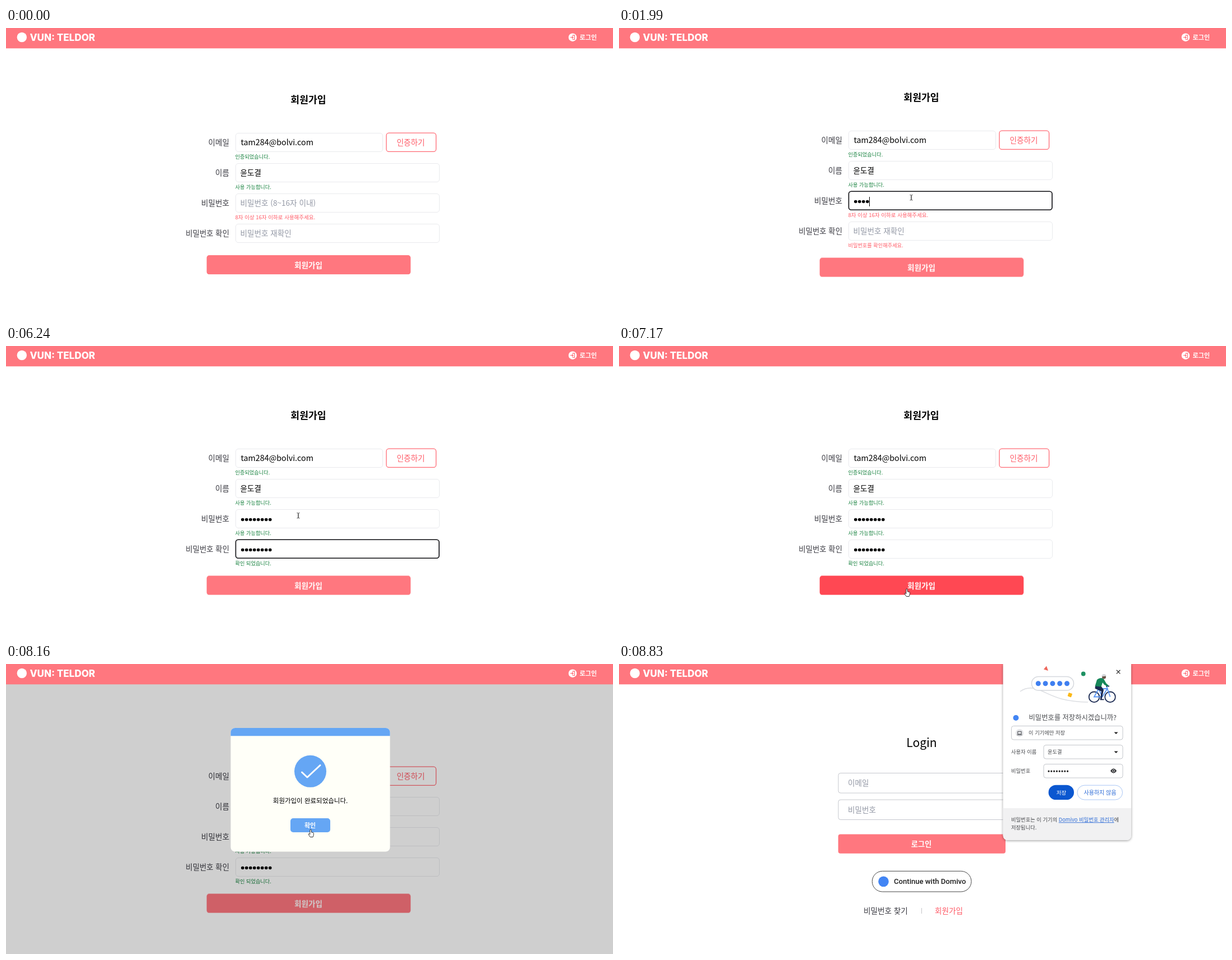
Animation of 1082 by 517 pixels, one loop 9420 ms. Source, as an HTML page:

```html
<!DOCTYPE html>
<html lang="ko">
<head>
<meta charset="utf-8">
<title>회원가입</title>
<style>
html, body { margin: 0; height: 100%; overflow: hidden; background: #fff; }
svg { display: block; width: 100%; height: 100%; font: 13.6px "Noto Sans CJK KR", sans-serif; }

.box { fill: #fff; stroke: #e9eaed; }
.focus { fill: none; stroke: #0b0b0f; stroke-width: 1.6; }
.label { fill: #3a3a42; }
.hint { fill: #9499a6; }
.end { text-anchor: end; }
.mid { text-anchor: middle; }
.msg { font-size: 9.2px; }
.ok { fill: #15803d; }
.err { fill: #ff5a66; }
.white { fill: #fff; }
.pink { fill: #ff777f; }
.blue { fill: #65a6f4; }
.bold { font-weight: 700; }
.dots { fill: none; stroke: #000; stroke-width: 5.6; stroke-dasharray: 0 7; stroke-linecap: round; }
.popup { font-size: 9.3px; fill: #484a4e; }
.popup .box { stroke: #c3c6cb; }

/* one loop = 9420ms, so 1% = 94.2ms */
.a { animation: 9.42s step-end infinite; }
.late { opacity: 0; }

.up { transform: translateY(4px); animation-name: up; }
.down { transform: translateY(-4.5px); animation-name: up; }
@keyframes up { 16.242% { transform: none; } }

#hint1, #msg4 { animation-name: type1; }
@keyframes type1 { 16.242% { opacity: var(--to); } }
#hint1 { --to: 0; }
#msg4 { --to: 1; }
#hint2 { animation-name: type2; }
@keyframes type2 { 45.753% { opacity: 0; } }
#err3 { animation-name: valid3; --to: 0; }
#ok3 { animation-name: valid3; --to: 1; }
@keyframes valid3 { 31.634% { opacity: var(--to); } }
#err4 { animation-name: valid4; --to: 0; }
#ok4 { animation-name: valid4; --to: 1; }
@keyframes valid4 { 60.615% { opacity: var(--to); } }

#focus1 { animation-name: focus1; }
@keyframes focus1 { 7.643% { opacity: 1; } 42.993% { opacity: 0; } }
#focus2 { animation-name: focus2; }
@keyframes focus2 { 42.993% { opacity: 1; } 73.354% { opacity: 0; } }

/* a white cover slides off the dots, carrying the caret */
#cover1 { transform: translateY(-2px); animation-name: cover1; }
@keyframes cover1 {
  16.242% { transform: translateX(7px); }
  17.622% { transform: translateX(14px); }
  19.002% { transform: translateX(21px); }
  21.125% { transform: translateX(28px); }
  23.142% { transform: translateX(35px); }
  25.265% { transform: translateX(42px); }
  28.768% { transform: translateX(49px); }
  31.634% { transform: translateX(56px); }
}
#cover2 { transform: translateY(-2px); animation-name: cover2; }
@keyframes cover2 {
  45.753% { transform: translateX(7px); }
  47.133% { transform: translateX(14px); }
  48.513% { transform: translateX(21px); }
  51.38% { transform: translateX(28px); }
  54.246% { transform: translateX(35px); }
  55.626% { transform: translateX(42px); }
  57.749% { transform: translateX(49px); }
  60.615% { transform: translateX(56px); }
}
#caret1 { animation-name: caret1; }
@keyframes caret1 {
  7.643%, 16.242% { opacity: 1; }
  13.375%, 37.261% { opacity: 0; }
}
#caret2 { animation-name: caret2; }
@keyframes caret2 {
  42.993%, 71.868% { opacity: 1; }
  66.242%, 73.354% { opacity: 0; }
}

#submit { animation: submit 9.42s linear infinite; }
@keyframes submit {
  0%, 69.74% { fill: #ff777f; }
  71.3%, 77.493% { fill: #ff4853; }
  77.494%, 100% { fill: #ff777f; }
}
#modal { animation-name: modal; }
@keyframes modal { 77.494% { opacity: 1; } 91.613% { opacity: 0; } }
#confirm { animation: confirm 9.42s linear infinite; }
@keyframes confirm {
  0%, 85.88% { fill: #74aff6; }
  86.6%, 100% { fill: #65a6f4; }
}
#login { animation-name: login; }
@keyframes login { 91.613% { opacity: 1; } }
#save { animation: save 9.42s linear infinite; }
@keyframes save { 0%, 92.357% { opacity: 0; } 93.6%, 100% { opacity: 1; } }

#pointer { animation: move 9.42s linear infinite, shown 9.42s step-end infinite; }
@keyframes shown { .743% { opacity: 1; } 91.613% { opacity: 0; } }
@keyframes move {
  0%, .743% { transform: translate(966px, 505px); animation-timing-function: ease-out; }
  5.4% { transform: translate(522px, 299px); }
  6.157%, 66.985% { transform: translate(521px, 302px); }
  70.5%, 73.354% { transform: translate(513px, 440px); }
  75.5%, 80.361% { transform: translate(513px, 433px); animation-timing-function: ease-in-out; }
  83.121%, 85.6% { transform: translate(539px, 303px); }
  86.5%, 100% { transform: translate(543px, 295px); }
}
#arrow { animation-name: arrow; }
@keyframes arrow {
  2.9%, 69.74%, 85.881% { opacity: 0; }
  68.95%, 77.494% { opacity: 1; }
}
#beam { animation-name: beam; }
@keyframes beam { 2.9% { opacity: 1; } 68.95% { opacity: 0; } }
#hand { animation-name: hand; }
@keyframes hand {
  69.74%, 85.881% { opacity: 1; }
  77.494% { opacity: 0; }
}
</style>
</head>
<body>
<svg viewBox="0 0 1082 517">
  <rect width="1082" height="517" class="white"/>

  <!-- sign-up form -->
  <g class="a up">
    <text x="539" y="130" class="mid bold" font-size="17.2">회원가입</text>

    <text x="398" y="204.5" class="label end">이메일</text>
    <rect x="409.5" y="183.5" width="262" height="33" rx="4.5" class="box"/>
    <text x="418.5" y="204.5" font-size="14.3">tam284@bolvi.com</text>
    <rect x="678" y="183.2" width="88.6" height="33.2" rx="4.5" fill="#fff" stroke="#ff6b75" stroke-width="1.3"/>
    <text x="721.5" y="204.5" class="mid err">인증하기</text>
    <text x="408.5" y="228.5" class="msg ok">인증되었습니다.</text>

    <text x="398" y="258.5" class="label end">이름</text>
    <rect x="409.5" y="237.5" width="363" height="33" rx="4.5" class="box"/>
    <text x="417.5" y="258.5">윤도결</text>
    <text x="408.5" y="282.5" class="msg ok">사용 가능합니다.</text>

    <text x="398" y="312.5" class="label end">비밀번호</text>
    <rect x="409.5" y="291.5" width="363" height="33" rx="4.5" class="box"/>
    <path d="M421.8 309.5h49.5" class="dots"/>
    <g id="cover1" class="a">
      <rect x="418" y="301" width="62" height="17" class="white"/>
      <rect id="caret1" class="a late" x="418" y="301" width="1" height="17"/>
    </g>
    <text id="hint1" x="417.5" y="312.5" class="a hint">비밀번호 (8~16자 이내)</text>
    <rect id="focus1" x="409.5" y="291.3" width="362.5" height="33" rx="4.5" class="a late focus"/>
    <text id="err3" x="408.5" y="336.5" font-size="9.5" class="a err">8자 이상 16자 이하로 사용해주세요.</text>
    <text id="ok3" x="408.5" y="336.5" class="a late msg ok">사용 가능합니다.</text>

    <text x="398" y="366.5" font-size="13.4" class="label end">비밀번호 확인</text>
    <rect x="409.5" y="345.5" width="363" height="33" rx="4.5" class="box"/>
    <path d="M421.8 363.5h49.5" class="dots"/>
    <g id="cover2" class="a">
      <rect x="418" y="355" width="62" height="17" class="white"/>
      <rect id="caret2" class="a late" x="418" y="355" width="1" height="17"/>
    </g>
    <text id="hint2" x="417.5" y="366.5" class="a hint">비밀번호 재확인</text>
    <rect id="focus2" x="409.5" y="345.3" width="362.5" height="33" rx="4.5" class="a late focus"/>
    <g id="msg4" class="a late msg">
      <text id="err4" x="408.5" y="390.5" class="a err">비밀번호를 확인해주세요.</text>
      <text id="ok4" x="408.5" y="390.5" class="a late ok">확인 되었습니다.</text>
    </g>
  </g>
  <g class="a down">
    <rect id="submit" x="357.7" y="409.6" width="363.6" height="34.2" rx="4.5"/>
    <text x="539" y="432" class="mid white bold">회원가입</text>
  </g>

  <!-- completion dialog -->
  <g id="modal" class="a late">
    <rect y="36" width="1082" height="481" opacity=".19"/>
    <rect x="400.5" y="114" width="284" height="220.5" rx="8" fill="#fffff8"/>
    <path d="M400.5 128.3V122a8 8 0 0 1 8-8h268a8 8 0 0 1 8 8v6.3z" class="blue"/>
    <circle cx="542.5" cy="191.3" r="28.5" class="blue"/>
    <path d="M527.5 193l9.5 9 23-21.5" fill="none" stroke="#fff" stroke-width="3" stroke-linecap="round" stroke-linejoin="round"/>
    <text x="542.5" y="248" font-size="11.5" class="mid">회원가입이 완료되었습니다.</text>
    <rect id="confirm" x="507" y="275" width="71" height="25" rx="5"/>
    <text x="542" y="291.5" font-size="11" class="mid white bold">확인</text>
  </g>

  <!-- login page -->
  <g id="login" class="a late">
    <rect width="1082" height="517" class="white"/>
    <text x="539.5" y="148" font-size="21" class="mid">Login</text>
    <g fill="#fff" stroke="#c6c8ce">
      <rect x="391" y="194.5" width="297.5" height="35.5" rx="4"/>
      <rect x="391" y="242" width="297.5" height="35.5" rx="4"/>
    </g>
    <text x="408" y="217" class="hint">이메일</text>
    <text x="408" y="264.5" class="hint">비밀번호</text>
    <rect x="390.7" y="303.6" width="298.3" height="34.2" rx="4" class="pink"/>
    <text x="539" y="325.7" font-size="13.2" class="mid white bold">로그인</text>
    <rect x="451.3" y="369.3" width="176.7" height="36.7" rx="18.3" fill="#fff" stroke="#444"/>
    <circle cx="471.5" cy="387.8" r="9.3" fill="#4285f4"/>
    <text x="490" y="392.3" fill="#1f1f1f" style="font: 500 13.1px Roboto, sans-serif">Continue with Domivo</text>
    <text x="436" y="445" class="label">비밀번호 찾기</text>
    <path d="M539.5 435v10" stroke="#c4c4c8"/>
    <text x="563" y="445" class="err">회원가입</text>
  </g>

  <!-- top bar -->
  <rect width="1082" height="36.3" class="pink"/>
  <circle cx="28.3" cy="16.5" r="8.7" class="white"/>
  <text x="42.5" y="22.7" class="white" style="font: 800 17px Inter, sans-serif">VUN: TELDOR</text>
  <circle cx="1010" cy="16.7" r="7.3" class="white"/>
  <path d="M1009.5 13h4v7.4h-4M1006 16.7h5m-2-2 2 2-2 2" fill="none" stroke="#ff777f" stroke-width="1.3"/>
  <text x="1022.5" y="20.7" font-size="11.1" class="white bold">로그인</text>

  <!-- browser prompt -->
  <g id="save" class="popup">
    <path d="M684.6 0h228.4v306a8 8 0 0 1-8 8h-212.4a8 8 0 0 1-8-8z" fill="#fff" style="filter: drop-shadow(0 1px 2px #0006)"/>
    <path d="M684.6 257h228.4v49a8 8 0 0 1-8 8h-212.4a8 8 0 0 1-8-8z" fill="#f1f1f2"/>

    <path d="M715 49q14-10 31-4c22 8 36 22 90 23" fill="none" stroke="#dcdee2" stroke-width="1.5"/>
    <rect x="735.5" y="22.5" width="75" height="24.5" rx="12.2" fill="#fff" stroke="#d5d8dd" stroke-width="1.5"/>
    <path d="M747.3 34.7h52" fill="none" stroke="#3f7ff0" stroke-width="9" stroke-dasharray="0 12.8" stroke-linecap="round"/>
    <path d="M757 9.5l5-6 3 8.5z" fill="#ee675c"/>
    <circle cx="827.7" cy="17.5" r="3.9" fill="#1e9162"/>
    <rect x="800.5" y="51.8" width="6.8" height="6.8" rx="1" fill="#fbb816" transform="rotate(20 804 55)"/>
    <g fill="none" stroke-width="1.8">
      <circle cx="847" cy="58.8" r="9.3" stroke="#1b2a52"/>
      <circle cx="875.5" cy="58.8" r="9.3" stroke="#1b2a52"/>
      <path d="M847 58.5l8-14.5h15.5l-9 14.5zM855 44l6.5 14.5M869 39.5l6.5 19" stroke="#5b96f5"/>
      <path d="M868 39.5h6" stroke="#1b2a52"/>
    </g>
    <path d="M849 38.5l10 .5 5 7-3.5 16.5h4v1.8h-7l2.3-15.5-11.3-5z" fill="#1b2a52"/>
    <path d="M852 28q6-5 12-1.5l4.5 8 4 3.5-1.5 2-6-3-3-4-2.5 7.5-11-1z" fill="#16875a"/>
    <circle cx="864.5" cy="23" r="3.5" fill="#6b5549"/>
    <path d="M860.5 22.5a4 4 0 0 1 8-1z" fill="#d4d6da"/>
    <path d="M886.8 10.8l6.6 6.6m0-6.6-6.6 6.6" stroke="#333" stroke-width="1.3"/>

    <circle cx="707.5" cy="96" r="5" fill="#4285f4"/>
    <text x="730.5" y="100" font-size="12.3">비밀번호를 저장하시겠습니까?</text>
    <rect x="699.5" y="110.5" width="198.5" height="24.5" rx="4" class="box"/>
    <circle cx="714" cy="123" r="7" fill="#e4e5e8"/>
    <path d="M710.8 120.3h6.4v4.7h-6.4zM709.5 126.3h9" fill="none" stroke="#44474c"/>
    <text x="730" y="126">이 기기에만 저장</text>

    <text x="699" y="159.7">사용자 이름</text>
    <rect x="757" y="144.5" width="141" height="24.5" rx="4" class="box"/>
    <text x="764" y="159.7">윤도결</text>
    <path d="M882.5 121.5h7l-3.5 3.5zM882.5 155.5h7l-3.5 3.5z" fill="#222"/>

    <text x="699" y="193.7">비밀번호</text>
    <rect x="757" y="178.5" width="141" height="24.5" rx="4" class="box"/>
    <path d="M766 191.2h34" fill="none" stroke="#222" stroke-width="3.2" stroke-dasharray="0 4.8" stroke-linecap="round"/>
    <path d="M876 190.5q5.5-8 11 0q-5.5 8-11 0z" fill="#303134"/>
    <circle cx="881.5" cy="190.5" r="2" fill="#303134" stroke="#fff" stroke-width=".9"/>

    <rect x="765.6" y="215.7" width="45.4" height="26.4" rx="13.2" fill="#0b57d0"/>
    <text x="788.5" y="232.5" font-size="9.6" class="mid white">저장</text>
    <rect x="817" y="216.2" width="80.5" height="25.8" rx="12.9" fill="#fff" stroke="#a9c6f5"/>
    <text x="857.5" y="232.5" font-size="10" class="mid" fill="#2c6bd6">사용하지 않음</text>

    <text x="699" y="281.3">비밀번호는 이 기기의 <tspan fill="#2c6bd6" text-decoration="underline">Domivo 비밀번호 관리자</tspan>에</text>
    <text x="699" y="295.3">저장됩니다.</text>
  </g>

  <!-- mouse -->
  <g id="pointer" class="late">
    <path id="arrow" class="a" d="M0 0v11.5l2.6-2.4 1.8 4 1.8-.8-1.8-3.9h3.7z" fill="#fff" stroke="#222" stroke-width=".8"/>
    <path id="beam" class="a late" d="M-2.5-4.5q2.5 0 2.5 1v7.5q0 1-2.5 1M2.5-4.5q-2.5 0-2.5 1v7.5q0 1 2.5 1" fill="none" stroke="#333" stroke-width=".9"/>
    <path id="hand" class="a late" d="M-1.2 1.2a1.2 1.2 0 0 1 2.4 0v3.6l3 .7q1.4.4 1.3 1.8l-.5 3.5-.9 2.7h-4.9l-2.8-4.3q-.7-1.5.7-1.7l1.7 1.3z" fill="#fff" stroke="#222" stroke-width=".9"/>
  </g>
</svg>
</body>
</html>
```
